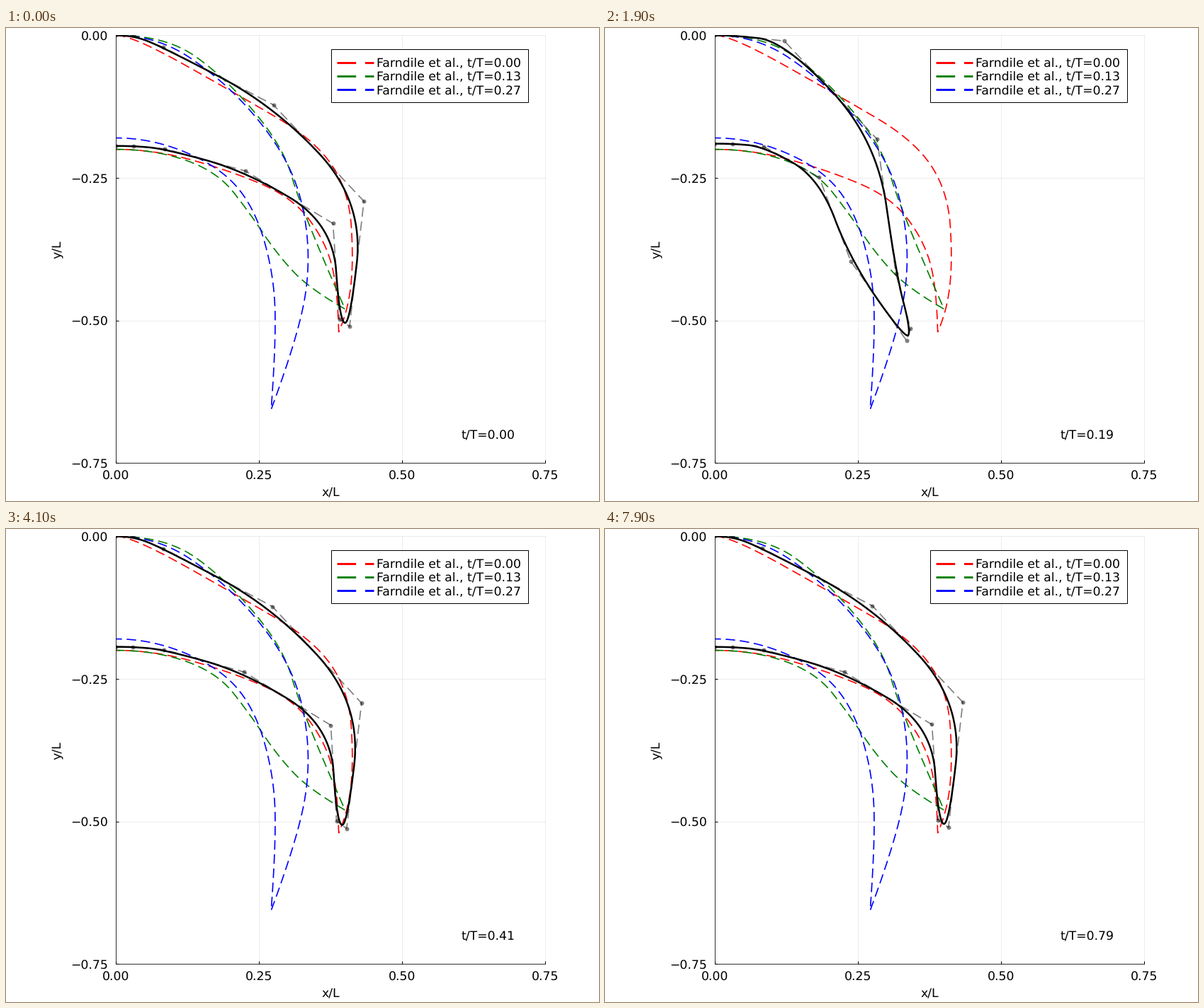
A matplotlib script that plays this animation: 837x669 px, repeating every 8 s.

```python
import numpy as np
import matplotlib.pyplot as plt
from matplotlib.animation import FuncAnimation
from matplotlib.patches import Rectangle

W, H = 837, 669
FRAMES, INTERVAL = 80, 100
plt.rcParams.update({"font.family": "DejaVu Sans", "font.size": 17.3,
                     "text.hinting": "no_hinting"})

# Reference bells: spline controls of the outer and inner side, in L/1000
PROFILES = {
    ("0.00", "red"): (
        [(0, 0), (28, 0), (216, -106), (348, -184), (407, -273),
         (415, -397), (405, -484), (389, -520)],
        [(0, -200), (67, -200), (204, -239), (309, -285), (365, -360),
         (387, -440), (389, -520)]),
    ("0.13", "green"): (
        [(0, 0), (86, 0), (191, -74), (293, -196), (322, -302), (400, -480)],
        [(0, -200), (67, -200), (176, -238), (234, -312), (280, -382),
         (337, -444), (400, -480)]),
    ("0.27", "blue"): (
        [(0, 0), (72, 0), (191, -82), (281, -186), (327, -285),
         (340, -415), (312, -545), (271, -656)],
        [(0, -180), (61, -180), (179, -229), (241, -300), (275, -415),
         (280, -533), (271, -656)]),
}

# Swimming poses: inner apex height, tip angle in degrees, then the joints
# (three outer, tip centre, two inner), in L/1000
REST = [-194, 144, 82, -21, 275, -122, 433, -291, 399, -504, 379, -330, 226, -238]
CONTRACT = [-198, 263, 101, -7, 280, -140, 366, -367, 408, -468, 285, -363, 189, -247]
SWEEP = [-190, 252, 121, -10, 283, -182, 316, -418, 338, -525, 237, -396, 182, -249]
EXTEND = [-183, 146, 158, -44, 292, -185, 372, -395, 291, -614, 305, -410, 216, -248]
PHASES = np.array([0, .11, .19, .29, .42])
POSES = np.array([REST, CONTRACT, SWEEP, EXTEND, REST], float)
SHOULDER, RIB, TIP = 30, 85, 11


def monotone_slopes(x, y):
    """Harmonic-mean slopes, zero where the direction turns."""
    d = np.diff(y, axis=0) / np.diff(x)[:, None]
    prod, total = d[:-1] * d[1:], d[:-1] + d[1:]
    inner = np.where(prod > 0, 2 * prod / np.where(prod > 0, total, 1), 0)
    return np.vstack([d[:1] / 2, inner, 0 * d[-1:]])


SLOPES = monotone_slopes(PHASES, POSES)


def pose(t):
    t = min(t, PHASES[-1])
    i = min(np.searchsorted(PHASES, t, side="right"), len(PHASES) - 1) - 1
    h = PHASES[i + 1] - PHASES[i]
    u = (t - PHASES[i]) / h
    a, b = POSES[i], POSES[i + 1]
    return (a + (b - a) * u * u * (3 - 2 * u)
            + h * u * (1 - u) * (SLOPES[i] * (1 - u) - SLOPES[i + 1] * u))


def control_points(t):
    apex, angle, *joints = pose(t)
    o1, o2, o3, tip, i2, i1 = np.reshape(joints, (-1, 2))
    turn = np.radians(angle)
    half = TIP * np.array([np.cos(turn), np.sin(turn)])
    ctrl = np.array([(0, 0), (SHOULDER, 0), o1, o2, o3, tip - half, tip + half,
                     i2, i1, (RIB, apex - 5), (SHOULDER, apex), (0, apex)])
    # The bell stays slightly narrow after the stroke and widens slowly
    late = max(t - PHASES[3], 0)
    ctrl[:, 0] *= 1 - .305 * late * np.exp(-12.7 * late)
    return ctrl / 1000


def bspline(ctrl, n=24):
    """Clamped uniform quadratic B-spline."""
    mid = (ctrl[1:-2] + ctrl[2:-1]) / 2
    joints = np.vstack([ctrl[:1], mid, ctrl[-1:]])
    u = np.linspace(0, 1, n)[:, None]
    return np.vstack([(1 - u) ** 2 * a + 2 * u * (1 - u) * c + u * u * b
                      for a, c, b in zip(joints[:-1], ctrl[1:-1], joints[1:])])


# At 72 dpi one point is one pixel
fig = plt.figure(figsize=((W + 1e-6) / 72, (H + 1e-6) / 72), dpi=72, facecolor="white")
ax = fig.add_axes([155.3 / W, 1 - 615.3 / H, 606 / W, 605 / H])
ax.set(xlim=(0, .75), ylim=(-.75, 0))
ticks = np.arange(4) / 4
ax.set_xticks(ticks, [f"{v:.2f}" for v in ticks])
ax.set_yticks(-ticks, [f"\u2212{v:.2f}" if v else "0.00" for v in ticks])
ax.tick_params(direction="in", length=4, width=1)
ax.tick_params(axis="x", pad=9.5)
ax.tick_params(axis="y", pad=11)
ax.spines[["top", "right"]].set_visible(False)
for v in ticks:
    grid = dict(color="black", alpha=.1, lw=.7, zorder=.5, clip_on=False)
    ax.axvline(v, **grid)
    ax.axhline(-v, **grid)

# Pixel-space layer for legend and labels
top = fig.add_axes([0, 0, 1, 1], zorder=5)
top.set(xlim=(0, W), ylim=(H, 0))
top.axis("off")
top.add_patch(Rectangle((459.2, 30.2), 278, 75, fc="white", ec="black", lw=1))
top.text(458.5, 657, "x/L", ha="center", va="center")
top.text(72, 313, "y/L", ha="center", va="center", rotation=90)
clock = top.text(642.5, 581.7, "", va="baseline")

dashed = dict(ls=(0, (8, 4)), dash_capstyle="butt")
for row, ((label, color), sides) in enumerate(PROFILES.items()):
    outer, inner = (bspline(np.array(s) / 1000) for s in sides)
    ax.plot(*np.vstack([outer, inner[::-1]]).T, color=color, lw=1.67, **dashed)
    y = 48.6 + 19.4 * row
    top.plot([466.5, 518.5], [y, y], color=color, lw=2.9,
             ls=(0, (9.2, 4.4)), dash_capstyle="butt")
    top.text(523, y + 6.2, f"Farndile et al., t/T={label}", va="baseline")

cage, = ax.plot([], [], color="black", alpha=.5, lw=1.67, **dashed)
dots, = ax.plot([], [], "o", color="black", alpha=.5, ms=6, mew=0)
bell, = ax.plot([], [], color="black", lw=2.5, solid_joinstyle="round")


def draw(i):
    t = i / 100
    ctrl = control_points(t)
    cage.set_data(*ctrl.T)
    dots.set_data(*ctrl.T)
    bell.set_data(*bspline(ctrl).T)
    clock.set_text(f"t/T={t:.2f}")
    return cage, dots, bell, clock


anim = FuncAnimation(fig, draw, frames=FRAMES, interval=INTERVAL, repeat=True)
plt.show()
```
